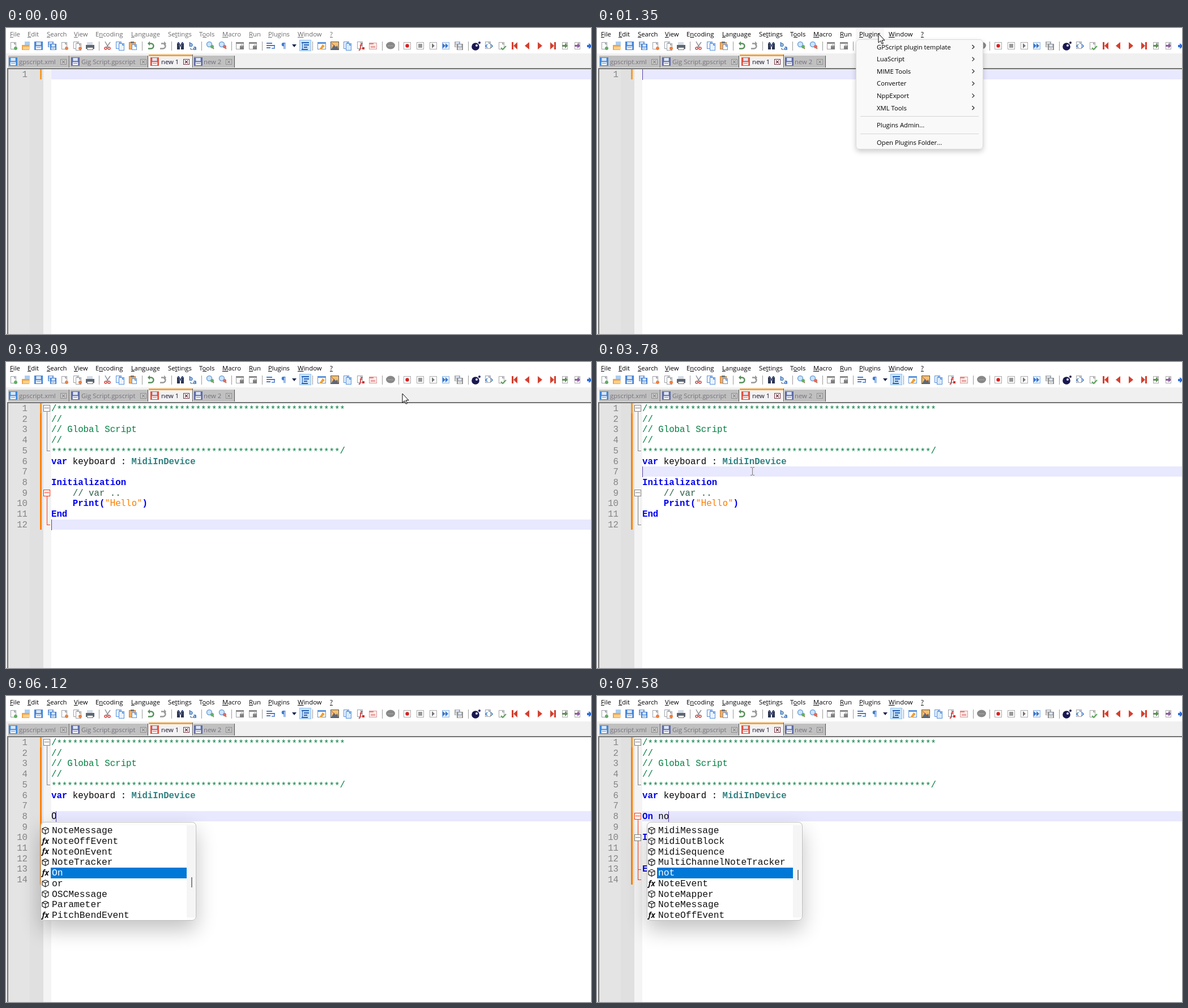
An HTML page with a canvas that plays this animation: 1033x542 px, repeating every 8 s.

```html
<!DOCTYPE html>
<html lang="en">
<head>
<meta charset="utf-8">
<title>Script editor</title>
<style>
  html, body { margin: 0; width: 100%; height: 100%; overflow: hidden; background: #fff; }
  canvas { display: block; }
</style>
</head>
<body>
<canvas id="stage" width="1033" height="542"></canvas>
<script>
const ctx = document.getElementById('stage').getContext('2d');
const LOOP = 8000, ROW = 18.7, CHAR = 9.436, LEFT = 80;
const UI = '"Open Sans", "Noto Sans", sans-serif';
const MONO = '"Liberation Mono", monospace';
const STRING = '"DejaVu Sans Mono", monospace';
const GREEN = '#007f40', BLUE = '#0000f0', ORANGE = '#ff8000';

const rect = (x, y, w, h, c) => { ctx.fillStyle = c; ctx.fillRect(x, y, w, h); };
const box = (x, y, w, h, c, fill) => {
  if (fill) rect(x, y, w, h, fill);
  ctx.strokeStyle = c; ctx.lineWidth = 1;
  ctx.strokeRect(x + .5, y + .5, w - 1, h - 1);
};
const line = (c, w, ...p) => {
  ctx.strokeStyle = c; ctx.lineWidth = w;
  ctx.beginPath();
  for (let i = 0; i < p.length; i += 2) ctx.lineTo(p[i], p[i + 1]);
  ctx.stroke();
};
const poly = (c, ...p) => {
  ctx.fillStyle = c;
  ctx.beginPath();
  for (let i = 0; i < p.length; i += 2) ctx.lineTo(p[i], p[i + 1]);
  ctx.closePath(); ctx.fill();
};
const dot = (x, y, r, c) => { ctx.fillStyle = c; ctx.beginPath(); ctx.arc(x, y, r, 0, 7); ctx.fill(); };
const ring = (x, y, r, c, w = 1.5, a = 0, b = 7) => {
  ctx.strokeStyle = c; ctx.lineWidth = w;
  ctx.beginPath(); ctx.arc(x, y, r, a, b); ctx.stroke();
};
const text = (s, x, y, c, font, align = 'left') => {
  ctx.font = font; ctx.fillStyle = c; ctx.textAlign = align;
  ctx.fillText(s, x, y);
};
const label = (s, x, y, c = '#000', align) => text(s, x, y + 4, c, '11.3px ' + UI, align);
const panel = (x, y, w, h, r, fill, edge, shade, blur, drop) => {
  ctx.save();
  ctx.shadowColor = `rgba(0,0,0,${shade})`; ctx.shadowBlur = blur; ctx.shadowOffsetY = drop;
  ctx.fillStyle = fill;
  ctx.beginPath(); ctx.roundRect(x, y, w, h, r); ctx.fill();
  ctx.restore();
  ctx.strokeStyle = `rgba(0,0,0,${edge})`; ctx.lineWidth = 1;
  ctx.beginPath(); ctx.roundRect(x + .5, y + .5, w - 1, h - 1, r); ctx.stroke();
};

// Menu bar: name, x, index of the underlined letter
const MENUS = [['File', 7, 0], ['Edit', 38, 0], ['Search', 72, 0], ['View', 120, 0], ['Encoding', 158, 1],
  ['Language', 221, 0], ['Settings', 286, 2], ['Tools', 341, 1], ['Macro', 382, 0], ['Run', 429, 0],
  ['Plugins', 463, 0], ['Window', 515, 0], ['?', 572, 0]];

function menuBar(active, open) {
  if (open) rect(457, 1, 50, 19, '#f7f7f7');
  const c = active ? '#000' : '#6a6a6a';
  for (const [name, x, u] of MENUS) {
    label(name, x, 11, c);
    const a = ctx.measureText(name.slice(0, u)).width;
    rect(x + a, 16, ctx.measureText(name[u]).width, 1, c);
  }
}

const page = (x, y, c = '#9da1a8', fill = '#fff', w = 10, h = 13) => {
  box(x, y, w, h, c, fill);
  poly(c, x + w - 4, y, x + w, y + 4, x + w - 4, y + 4);
};
const disk = (x, y, s, c) => {
  box(x, y, s, s, c, c);
  rect(x + s * .22, y + 1, s * .56, s * .36, '#dbe6f6');
  rect(x + s * .18, y + s * .56, s * .64, s * .36, '#fff');
  rect(x + s * .25, y + s * .68, s * .5, 1, c);
};
const lens = (x, c) => {
  line('#a08060', 2, x + 2, 33, x + 6, 37);
  dot(x - 2, 29, 4.5, '#cfe4fa'); ring(x - 2, 29, 4.5, '#6fa3dc');
  dot(x + 3, 33, 3, c);
};
const curl = (x, dir, c) => {
  ring(x, 32, 4.5, c, 2.5, -1.6, 1.6);
  line(c, 2.5, x - 5, 36.5, x, 36.5);
  line(c, 2.5, x - 3, 27.5, x, 27.5);
  poly(c, x - 6 * dir, 27.5, x - 2 * dir, 23.5, x - 2 * dir, 31.5);
};
const lockWindow = x => {
  box(x - 7, 25, 14, 13, '#a0a0a0', '#fafafa');
  rect(x - 7, 25, 14, 3, '#8a8a8a');
  rect(x, 32, 7, 6, '#808080'); ring(x + 3.5, 32, 2, '#808080', 1);
};

function toolbar() {
  for (const x of [164, 240, 292, 345, 398, 452, 541, 664, 693, 816]) rect(x, 24, 1, 16, '#9a9a9a');
  page(8, 25); dot(17, 36, 3, '#5fae5f');
  rect(33, 24, 9, 9, '#a9cdf2'); rect(28, 30, 13, 9, '#f0a447'); rect(30, 33, 12, 5, '#ffd08a');
  disk(50, 24, 15, '#4684d4');
  disk(74, 24, 10, '#6b9bd8'); disk(78, 28, 11, '#4684d4');
  page(98, 25); dot(107, 36, 3, '#ee8040');
  page(119, 24); page(123, 27); dot(131, 36, 3, '#ee8040');
  rect(143, 25, 10, 6, '#d4dbe4'); rect(141, 30, 15, 7, '#5d6670'); box(143, 34, 11, 5, '#777', '#fff');
  line('#8a8f98', 1.5, 175, 24, 181, 35); line('#8a8f98', 1.5, 184, 25, 177, 35);
  ring(176, 36, 2, '#d9403c'); ring(182, 36, 2, '#d9403c');
  page(194, 24, '#5b93da', '#eaf3fd'); page(199, 27, '#5b93da', '#eaf3fd');
  box(217, 25, 12, 13, '#c57b30', '#f4ae62'); rect(220, 24, 6, 3, '#777'); page(222, 29, '#5b93da', '#fff', 9, 10);
  curl(256, 1, '#57905a'); curl(277, -1, '#999');
  rect(302, 27, 5, 11, '#2c3550'); rect(309, 27, 5, 11, '#2c3550'); rect(305, 29, 6, 4, '#53608a');
  rect(303, 25, 3, 3, '#53608a'); rect(310, 25, 3, 3, '#53608a');
  text('b', 323, 33, '#2968b8', 'bold 11px ' + UI); text('a', 330, 39, '#2968b8', 'bold 11px ' + UI);
  line('#50607a', 1, 326, 35, 326, 38, 330, 38);
  lens(361, '#62b162'); lens(383, '#e2695c');
  lockWindow(413); lockWindow(436);
  for (const [y, w] of [[26, 10], [30, 15], [34, 7]]) rect(460, y, w, 2, '#4a78c4');
  line('#4a78c4', 1.5, 474, 31, 474, 36, 469, 36);
  text('¶', 486, 36, '#3c7bd0', 'bold 13px ' + UI);
  poly('#1c2350', 505, 29, 513, 29, 509, 34);
  box(518, 21, 21, 20, '#90c0f0', '#cce4fb');
  for (const [x, y, w] of [[522, 25, 13], [526, 29, 9], [526, 33, 6], [522, 37, 11]]) rect(x, y, w, 2, '#2460b4');
  line('#2460b4', 1, 523.5, 27, 523.5, 37);
  box(550, 25, 15, 13, '#5b93da', '#fff'); rect(550, 25, 15, 3, '#5b93da'); poly('#f0a030', 553, 38, 559, 29, 563, 32, 557, 38);
  box(573, 24, 15, 15, '#555', '#f3c070'); poly('#5b6a78', 574, 38, 579, 30, 582, 34, 585, 31, 587, 38); line('#b44', 1, 575, 27, 585, 36);
  page(596, 24, '#5b93da', '#eaf3fd'); page(600, 27, '#5b93da', '#d9eafb');
  page(620, 24); text('f', 624, 37, '#d43030', 'italic bold 12px ' + UI); rect(629, 34, 4, 4, '#d43030');
  box(641, 26, 14, 12, '#d99', '#fbeaea'); rect(641, 26, 8, 3, '#e58a84'); rect(644, 32, 8, 3, '#e9a49e');
  ctx.fillStyle = '#888'; ctx.beginPath(); ctx.ellipse(679, 31, 8, 6.5, 0, 0, 7); ctx.fill();
  rect(674, 31, 10, 1, '#aaa');
  box(702, 25, 13, 13, '#aaa', '#fff'); dot(708.5, 31.5, 3.2, '#d82020');
  box(725, 25, 13, 13, '#aaa', '#fff'); rect(728, 28, 7, 7, '#999');
  box(748, 25, 13, 13, '#aaa', '#fff'); poly('#777', 752, 27, 757, 31.5, 752, 36);
  box(770, 25, 13, 13, '#8ab4e6', '#eaf3fd');
  poly('#3a77c8', 771, 27, 776, 31.5, 771, 36); poly('#3a77c8', 776, 27, 781, 31.5, 776, 36);
  disk(792, 24, 10, '#aaa'); disk(796, 28, 11, '#909090');
  dot(829, 33, 6.8, '#191850'); dot(831, 31, 2, '#e8e8ff'); dot(836, 26, 2, '#191850');
  page(846, 24); line('#3b7ed2', 1.7, 850, 29, 847, 32, 850, 35); line('#3b7ed2', 1.7, 856, 29, 859, 32, 856, 35);
  page(870, 25, '#a5a5a5'); line('#5aa35a', 2, 874, 35, 877, 38, 883, 32);
  const red = '#d5402f';
  rect(893, 25, 3, 13, red); poly(red, 903, 25, 903, 38, 896, 31.5);
  poly(red, 924, 25, 924, 38, 916, 31.5);
  poly(red, 939, 25, 939, 38, 947, 31.5);
  poly(red, 961, 25, 961, 38, 968, 31.5); rect(968, 25, 3, 13, red);
  for (const [x, c] of [[982, '#5d8f55'], [1004, '#8a5a9c']]) {
    page(x, 25, '#aaa'); rect(x, 30, 6, 3, c); poly(c, x + 5, 27, x + 10, 31.5, x + 5, 36);
  }
  rect(1026, 30, 4, 4, '#2f6fdc'); poly('#2f6fdc', 1029, 27, 1033, 30, 1033, 34, 1029, 37);
}

// Tabs: name, x, width, icon colour, icon x, text x, close x
const TABS = [['gpscript.xml', 4, 107, '#3f87d8', 5, 23, 96], ['Gig Script.gpscript', 113, 137, '#5f6aa4', 115, 133, 237],
  ['new 1', 252, 77, '#e05040', 255, 274, 313], ['new 2', 331, 72, '#5f6aa4', 332, 349, 388]];

function tabs() {
  rect(0, 45, 1033, 26, '#f0f0f0');
  TABS.forEach(([name, x, w, c, ix, tx, cx], i) => {
    const on = i === 2, top = on ? 47 : 49;
    rect(x, top, w, 70 - top, on ? '#f2f2f2' : '#c0c0c0');
    rect(x + w, top, 1, 70 - top, '#555');
    if (on) rect(x, 47, w, 3, '#faa232');
    disk(ix, 52, 15, c);
    label(name, tx, 60, on ? '#1a1030' : '#77717e');
    const k = on ? '#703040' : '#8c8c8c';
    box(cx, 55, 11, 10, k, on ? '#fff' : '#ccc');
    line(k, 1.5, cx + 3, 57.5, cx + 8, 62.5); line(k, 1.5, cx + 8, 57.5, cx + 3, 62.5);
  });
}

const rowTop = n => 73 + ROW * (n - 1);
const rowMid = n => rowTop(n) + 9.3;

function code(s, n, col, c, bold, family = MONO) {
  text(s, LEFT + col * CHAR, rowMid(n) + 4.7, c, (bold ? 'bold ' : '') + '15.73px ' + family);
}
// Asterisks sit lower than the font places them
function stars(n, col) {
  text('*'.repeat(54), LEFT + col * CHAR, rowMid(n) + 6.7, GREEN, '15.73px ' + MONO);
}
function foldBox(n, c) {
  const y = Math.round(rowMid(n));
  box(66, y - 6, 12, 12, c, '#fff');
  rect(68, y - 1, 8, 1, c);
}
function foldLine(from, to, c) {
  const y = Math.round(rowMid(to));
  rect(72, rowMid(from) + 6, 1, y - rowMid(from) - 6, c);
  rect(72, y, 6, 1, c);
}

function editor(t) {
  const filled = t >= 2750;
  const gap = t < 4510 ? 0 : t < 5500 ? 1 : 2;
  const count = filled ? 12 + gap : 1;
  const current = !filled ? 1 : t < 3780 ? 12 : t < 4510 ? 7 : t < 4770 ? 8 : t < 5500 ? 7 : 8;

  rect(0, 70, 1033, 472, '#f0f0f0');
  rect(2, 71, 1031, 471, '#707070');
  rect(4, 73, 1029, 469, '#fff');
  rect(4, 73, 38, 469, '#e4e4e4');
  rect(42, 73, 24, 469, '#e0e0e0');
  rect(66, 73, 14, 469, '#f4f4f4');
  const top = Math.round(rowTop(current));
  rect(LEFT, top, 953, Math.floor(rowTop(current + 1)) - top, '#e8e8ff');
  rect(60, 73, 3, Math.floor(ROW * count), ORANGE);
  rect(60, 73, 3, 18, '#f59a2c');
  for (let n = 1; n <= count; n++) text(n, 38, rowMid(n) + 4.7, '#858585', '15.73px ' + MONO, 'right');

  let col = 0;
  if (filled) {
    const init = 8 + gap;
    code('/', 1, 0, GREEN); stars(1, 1);
    code('//', 2, 0, GREEN);
    code('// Global Script', 3, 0, GREEN);
    code('//', 4, 0, GREEN);
    stars(5, 0); code('/', 5, 54, GREEN);
    code('var', 6, 0, BLUE, true);
    code('keyboard :', 6, 4, '#000');
    code('MidiInDevice', 6, 15, '#2f8080', true);
    code('Initialization', init, 0, BLUE, true);
    code('// var ..', init + 1, 4, '#2c5f48');
    code('Print(', init + 2, 4, BLUE, true);
    code('"Hello"', init + 2, 10, ORANGE, false, STRING);
    code(')', init + 2, 17, BLUE, true);
    code('End', init + 3, 0, BLUE, true);

    foldBox(1, '#808080'); foldLine(1, 5, '#808080');
    const head = gap < 2 ? 9 : 10, hot = '#ff3010';
    if (t >= 6320) {
      foldLine(8, 14, hot); rect(72, Math.round(rowMid(13)), 6, 1, hot);
      foldBox(8, hot); foldBox(10, '#808080');
    } else {
      const c = t < 3780 ? hot : '#808080';
      foldLine(head, head + 3, c); foldBox(head, c);
    }
    if (t >= 6320) { code('On', 8, 0, BLUE, true); col = t < 6460 ? 2 : 3; }
    else if (t >= 6050) { code('O', 8, 0, '#000', false, STRING); col = 1; }
    const word = t < 7380 ? '' : t < 7580 ? 'n' : 'no';
    code(word, 8, 3, '#000');
    col += word.length;
  }
  // Caret blinks: on/off spans
  const lit = [[1080, 1420], [1950, 2420], [2750, 3280], [3780, 4310], [4510, 5370], [5500, 7050], [7380, 8000]];
  if (lit.some(([a, b]) => t >= a && t < b))
    rect(LEFT + Math.round(col * CHAR) - (col ? 1 : 0), top, 1, 19, '#5a40b0');
}

function pluginMenu(t) {
  if (t < 1150 || t >= 2750) return;
  ctx.globalAlpha = Math.min(1, .5 + Math.floor((t - 1150) / 67) * .25);
  panel(457, 20, 225, 195, 6, '#f9f9f9', .12, .2, 10, 4);
  if (t >= 1550) rect(461, 23, 217, 21, '#f0f0f0');
  ['GPScript plugin template', 'LuaScript', 'MIME Tools', 'Converter', 'NppExport', 'XML Tools'].forEach((s, i) => {
    const y = 33.5 + i * 21.6;
    label(s, 494, y);
    line('#222', 1.2, 662.5, y - 3.5, 666, y, 662.5, y + 3.5);
  });
  rect(465, 156, 209, 1, '#d5d5d5'); rect(465, 187, 209, 1, '#d5d5d5');
  label('Plugins Admin...', 494, 172); label('Open Plugins Folder...', 494, 202.5);

  if (t >= 1810) {
    ctx.globalAlpha = t < 1880 ? .6 : 1;
    panel(678, 20, 323, 79, 6, '#f9f9f9', .12, .2, 10, 4);
    rect(685, 27, 309, 1, '#d5d5d5');
    if (t >= 2080) rect(682, 31, 315, 22, '#f0f0f0');
    label('GPScript create Global Script', 714, 42);
    label('Auto Indent', 714, 64); label('Ctrl+F10', 977, 64, '#000', 'right');
    label('Show function help', 714, 85.5); label('Shift+Spacebar', 977, 85.5, '#000', 'right');
  }
  ctx.globalAlpha = 1;
}

function symbol(x, y, isFn) {
  if (isFn) return text('fx', x - 6, y + 4.5, '#111', 'italic bold 13.5px ' + UI);
  line('#222', 1.2, x, y - 6, x + 5.5, y - 3.5, x + 5.5, y + 3, x, y + 6, x - 5.5, y + 3, x - 5.5, y - 3.5, x, y - 6);
  line('#222', 1.2, x - 5.5, y - 3.5, x, y - 1, x + 5.5, y - 3.5);
  line('#222', 1.2, x, y - 1, x, y + 6);
}

function completion(x, items, thumbY) {
  panel(x, 223, 275, 175, 7, '#fcfcfc', .25, .24, 36, 16);
  rect(x + 2, 229, 257, 167, '#fff');
  rect(x + 258, 229, 15, 163, '#f5f5f5');
  rect(x + 266, thumbY, 2, 18, '#858585');
  rect(x + 18, 304, 240, 19, '#0078d7');
  items.forEach((s, i) => {
    const y = 238.5 + i * 18.7;
    symbol(x + 8.5, y, /Event$|^On$/.test(s));
    text(s, x + 20, y + 4.8, i === 4 ? '#fff' : '#111', '16.3px ' + MONO);
  });
}

function popups(t) {
  if (t >= 6050 && t < 6520) {
    ctx.globalAlpha = t < 6120 || t >= 6460 ? .5 : 1;
    completion(61, ['NoteMessage', 'NoteOffEvent', 'NoteOnEvent', 'NoteTracker', 'On', 'or',
      'OSCMessage', 'Parameter', 'PitchBendEvent'], 321);
    ctx.globalAlpha = 1;
  } else if (t >= 7380) {
    completion(88, ['MidiMessage', 'MidiOutBlock', 'MidiSequence', 'MultiChannelNoteTracker', 'not',
      'NoteEvent', 'NoteMapper', 'NoteMessage', 'NoteOffEvent'], 308);
  }
}

// Pointer moves: start, end, steps, target
const MOVES = [[240, 1010, 12, 481, 10], [1080, 1280, 4, 496.5, 9.5], [1420, 1880, 7, 640, 34],
  [1950, 2350, 6, 749, 40.5], [3010, 3640, 10, 274, 193]];

function pointer(t) {
  if (t < 240 || t >= 6050) return;
  let x = 968, y = 530;
  for (const [a, b, n, tx, ty] of MOVES) {
    if (t < a) break;
    const p = Math.min(1, (Math.floor((t - a) / (b - a) * (n - 1) + 1e-6) + 1) / n);
    const e = p * p * (3 - 2 * p);
    x += (tx - x) * e; y += (ty - y) * e;
  }
  ctx.save();
  ctx.translate(Math.round(x), Math.round(y));
  if (y > 73) {
    const c = '#777';
    line(c, 1, -3, -6.5, -1, -6.5, .5, -5.5, .5, 6.5, -1, 7.5, -3, 7.5);
    line(c, 1, 4, -6.5, 2, -6.5, .5, -5.5); line(c, 1, .5, 6.5, 2, 7.5, 4, 7.5);
  } else {
    const shape = [0, 0, 0, 16, 3.7, 12.6, 6.2, 18.3, 8.4, 17.3, 6, 11.8, 11, 11.8];
    poly('#fff', ...shape); line('#000', 1, ...shape, 0, 0);
  }
  ctx.restore();
}

function draw(now) {
  const t = now % LOOP;
  rect(0, 0, 1033, 542, '#fff');
  menuBar(t >= 1080, t >= 1080 && t < 2750);
  toolbar();
  tabs();
  editor(t);
  pluginMenu(t);
  popups(t);
  pointer(t);
}

const start = performance.now();
function tick() {
  draw(performance.now() - start);
  requestAnimationFrame(tick);
}
tick();
</script>
</body>
</html>
```
